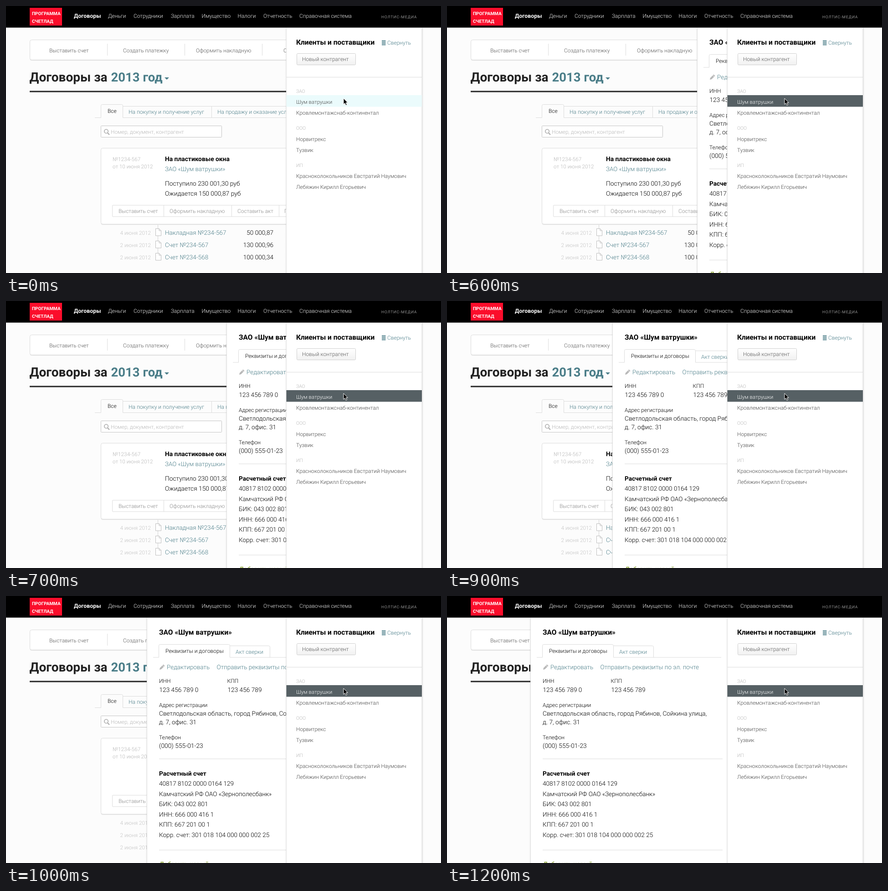
Recreate the animation shown at these times as an HTML page. Size 955 by 587 pixels, loop 2.2 s.

```html
<!DOCTYPE html>
<html lang="ru">
<head>
<meta charset="utf-8">
<title>Договоры</title>
<style>
html, body { margin: 0; width: 100%; height: 100%; overflow: hidden; background: #fcfcfc; }
svg { display: block; width: 955px; height: 587px; }
text { font-family: Roboto, "Open Sans", sans-serif; font-weight: 300; text-rendering: geometricPrecision; white-space: pre; }
text.bold { font-weight: 700; }
</style>
</head>
<body>
<svg id="stage" viewBox="0 0 955 587" xmlns="http://www.w3.org/2000/svg"></svg>
<script>
const LOOP = 2200, START = 500, STEP = 100;
// left edge of the sliding panel, one stop per step
const STOPS = [616, 550, 485, 425, 364, 310, 251, 184];
const TEAL = '#4a7d88', INK = '#000', GREY = '#555', PALE = '#b4b4b4', LINE = '#dcdcdc';
const stage = document.getElementById('stage');

const text = (s, x, y, size, fill = INK, extra = '') =>
  `<text x="${x}" y="${y}" font-size="${size}" fill="${fill}" ${extra}>${s}</text>`;
const bold = (s, x, y, size, fill = '#000') => text(s, x, y, size, fill, 'class="bold"');
const right = (s, x, y, size, fill) => text(s, x, y, size, fill, 'text-anchor="end"');
const rect = (x, y, w, h, fill, extra = '') =>
  `<rect x="${x}" y="${y}" width="${w}" height="${h}" fill="${fill}" ${extra}/>`;
const path = (d, stroke = LINE, fill = 'none', extra = '') =>
  `<path d="${d}" stroke="${stroke}" fill="${fill}" ${extra}/>`;
const hline = (x1, x2, y, color) => path(`M${x1} ${y}H${x2}`, color);
const vline = (x, y1, y2, color) => path(`M${x} ${y1}V${y2}`, color);
const box = (x, y, w, h, r, stroke = LINE, fill = '#fff') =>
  rect(x, y, w, h, fill, `rx="${r}" stroke="${stroke}"`);
const card = (x, y, w, h) =>
  rect(x, y + 2, w, h, '#000', 'rx="4" opacity=".05"') +
  rect(x, y + 1, w, h, '#000', 'rx="4" opacity=".07"') + box(x, y, w, h, 4);

const defs = `<defs>
  <linearGradient id="shadeL"><stop offset="0" stop-color="#000" stop-opacity="0"/><stop offset="1" stop-color="#000" stop-opacity=".07"/></linearGradient>
  <linearGradient id="shadeR"><stop offset="0" stop-color="#000" stop-opacity=".1"/><stop offset="1" stop-color="#000" stop-opacity="0"/></linearGradient>
  <linearGradient id="btn" x2="0" y2="1"><stop offset="0" stop-color="#fff"/><stop offset="1" stop-color="#f1f1f1"/></linearGradient>
  <clipPath id="left"><rect width="616" height="587"/></clipPath>
</defs>`;

function header() {
  const items = [['Деньги', 224], ['Сотрудники', 280], ['Зарплата', 362], ['Имущество', 429.5],
    ['Налоги', 508.5], ['Отчетность', 565], ['Справочная система', 644]];
  return rect(0, 0, 955, 47.5, '#000') + rect(52, 4, 71, 39, '#fb0d2b') +
    bold('ПРОГРАММА', 57, 20, 10, '#fff') + bold('СЧЕТЛАД', 57, 37, 10, '#fff') +
    bold('Договоры', 149, 26, 12.4, '#fff') +
    items.map(([s, x]) => text(s, x, 26, 11.9, '#f4f4f4')).join('') +
    text('НОЛТИС-МЕДИА', 824, 27, 8.5, '#ddd', 'letter-spacing="1"');
}

function actions() {
  const items = [['Выставить счет', 95], ['Создать платежку', 257],
    ['Оформить накладную', 417], ['Составить акт', 609]];
  return card(52.5, 74.5, 700, 44) +
    items.map(([s, x]) => text(s, x, 102, 11.9, GREY)).join('') +
    [222.5, 392.5, 562.5].map(x => vline(x, 83, 109)).join('');
}

function deal() {
  const buttons = [['Выставить счет', 247], ['Оформить накладную', 359],
    ['Составить акт', 508], ['Платежка', 611]];
  return card(208.5, 312.5, 600, 167) +
    text('№1234-567', 234, 341, 11.8, PALE) + text('от 10 июня 2012', 234, 357, 11.7, PALE) +
    bold('На пластиковые окна', 349, 341, 13.8) +
    text('ЗАО «Шум ватрушки»', 349, 363, 13.4, TEAL) +
    text('Поступило 230 001,30 руб', 349, 394.5, 13.8) +
    text('Ожидается 150 000,87 руб', 349, 417, 13.8) +
    box(233.5, 438, 500, 25, 1) +
    [346.5, 495.5, 599.5].map(x => vline(x, 438, 463)).join('') +
    buttons.map(([s, x]) => text(s, x, 454.5, 11.9, '#888')).join('');
}

function docs() {
  const rows = [['4 июня 2012', 'Накладная №234-567', '50 000,87'],
    ['2 июня 2012', 'Счет №234-567', '130 000,96'], ['2 июня 2012', 'Счет №234-568', '100 000,34']];
  return vline(333.5, 481, 550, '#d5d5d5') + rows.map(([day, name, sum], i) => {
    const y = 503 + 27 * i;
    return right(day, 318, y - .5, 11.75, '#c2c2c2') +
      path(`M328.5 ${y - 13.5}h7.5l4.5 4.5v11h-12zM336 ${y - 13.5}v4.5h4.5`, '#bdbdbd', '#fff') +
      text(name, 349, y, 13.5, TEAL) + right(sum, 587, y, 13.6);
  }).join('');
}

function page() {
  return rect(0, 47, 955, 540, '#fcfcfc') + actions() +
    bold('Договоры за', 51.5, 166, 28, '#222') + bold('2013 год', 230.5, 166, 27.5, TEAL) +
    path('M348 157h10l-5 5z', 'none', TEAL) + rect(52, 186.5, 640, 3, '#262626') +
    path('M195 245.5H208.5V219.5Q208.5 216.5 211.5 216.5H253.5Q256.5 216.5 256.5 219.5V245.5H700') +
    path('M257 220.5H700M451.5 220.5V245') +
    text('Все', 223, 235, 11.9) +
    text('На покупку и получение услуг', 269, 237, 12.1, TEAL) +
    text('На продажу и оказание услуг', 464, 237, 12.1, TEAL) +
    box(208.5, 263.5, 265, 25, 1, '#c4c4c4') +
    '<circle cx="220" cy="275.5" r="4.2" fill="none" stroke="#aaa" stroke-width="1.6"/>' +
    path('M223 279l4 4', '#aaa', 'none', 'stroke-width="2.2"') +
    text('Номер, документ, контрагент', 230, 280.5, 11.9, PALE) +
    deal() + docs();
}

// drawn from its own left edge at x = 0
function panel() {
  const account = ['40817 8102 0000 0164 129', 'Камчатский РФ ОАО «Зернополесбанк»',
    'БИК: 043 002 801', 'ИНН: 666 000 416 1', 'КПП: 667 201 00 1',
    'Корр. счет: 301 018 104 000 000 002 25'];
  return rect(-4, 48, 4, 539, 'url(#shadeL)') + rect(0, 48, 432, 539, '#fff') +
    vline(-.5, 48, 587, '#dedede') +
    bold('ЗАО «Шум ватрушки»', 26, 85, 15.5) +
    path('M13 135H25.5V109.5Q25.5 106.5 28.5 106.5H178.5Q181.5 106.5 181.5 109.5V135H418') +
    path('M182 109.5H266.5Q269.5 109.5 269.5 112.5V135') +
    text('Реквизиты и договоры', 40, 124.5, 12) + text('Акт сверки', 194, 127, 12, TEAL) +
    path('M27 162l1-4 7.5-7.5 3 3-7.5 7.5z', 'none', '#b9b9b9') +
    path('M33.5 152.5l3 3', '#fff') +
    text('Редактировать', 43, 161, 13.45, TEAL) +
    text('Отправить реквизиты по эл. почте', 152.5, 161, 13.55, TEAL) +
    text('ИНН', 26, 191, 12) + text('123 456 789 0', 26.5, 210.5, 13.7) +
    text('КПП', 175.5, 191, 12) + text('123 456 789', 176.5, 210.5, 13.7) +
    text('Адрес регистрации', 26, 243.5, 12) +
    text('Светлодольская область, город Рябинов, Сойкина улица,', 26, 262.5, 13.7) +
    text('д. 7, офис. 31', 26, 281.5, 13.7) +
    text('Телефон', 26, 314.5, 12) + text('(000) 555-01-23', 26, 333.5, 13.8) +
    hline(26, 421, 358, LINE) + bold('Расчетный счет', 26, 394.5, 13.6) +
    account.map((s, i) => text(s, 26, 417 + 22.5 * i, 13.6)).join('') +
    hline(26, 421, 558.5, LINE) + bold('Добавить новый', 27, 594.3, 13.6, '#93a944');
}

function sidebar() {
  const groups = [['ЗАО', 190.5], ['ООО', 272], ['ИП', 353.5]];
  const rows = [['Кровлемонтажснаб-континентал', 239], ['Норвитрекс', 296.5], ['Тузвик', 320.5],
    ['Красноколокольников Евстратий Наумович', 378], ['Лебяжин Кирилл Егорьевич', 402]];
  return rect(612, 48, 4, 539, 'url(#shadeL)') + rect(913, 48, 4, 539, 'url(#shadeR)') +
    rect(616, 48, 297, 539, '#fff') +
    vline(615.5, 48, 587, '#e2e2e2') + vline(913, 48, 587, '#dedede') +
    bold('Клиенты и поставщики', 637, 85, 15.45) +
    [76, 79, 82, 85].map(y => rect(825, y - .5, 8.5, 1.7, TEAL)).join('') +
    text('Свернуть', 837, 84.5, 12, TEAL) +
    box(638.5, 104.5, 129, 25, 2, '#cfcfcf', 'url(#btn)') +
    text('Новый контрагент', 650, 121, 12, GREY) + hline(616, 913, 156.5, LINE) +
    groups.map(([s, y]) => text(s, 637, y, 10.4, PALE)).join('') +
    '<rect id="row" x="615.5" y="196" width="297.5" height="25.5"/>' +
    text('Шум ватрушки', 637, 214.5, 11.6, '#444', 'id="rowText"') +
    rows.map(([s, y]) => text(s, 637, y, 11.85, '#444')).join('') +
    path('M741 203v13.2l3-2.7 2.2 4.8 2.3-1-2.2-4.6h4z', '#fff', '#000');
}

stage.innerHTML = defs + page() +
  '<g clip-path="url(#left)"><g id="panel">' + panel() + '</g></g>' + sidebar() + header();
const [slide, row, rowText] = ['panel', 'row', 'rowText'].map(id => document.getElementById(id));

function draw(time) {
  const t = time % LOOP, on = t >= START;
  const step = Math.min(STOPS.length - 1, Math.max(0, Math.floor((t - START) / STEP)));
  slide.setAttribute('transform', `translate(${STOPS[step]} 0)`);
  slide.setAttribute('visibility', step ? 'visible' : 'hidden');
  row.setAttribute('fill', on ? '#566064' : '#ebfbfc');
  rowText.setAttribute('fill', on ? '#fff' : '#444');
}

const began = performance.now();
function tick() {
  draw(performance.now() - began);
  requestAnimationFrame(tick);
}
tick();
</script>
</body>
</html>
```
